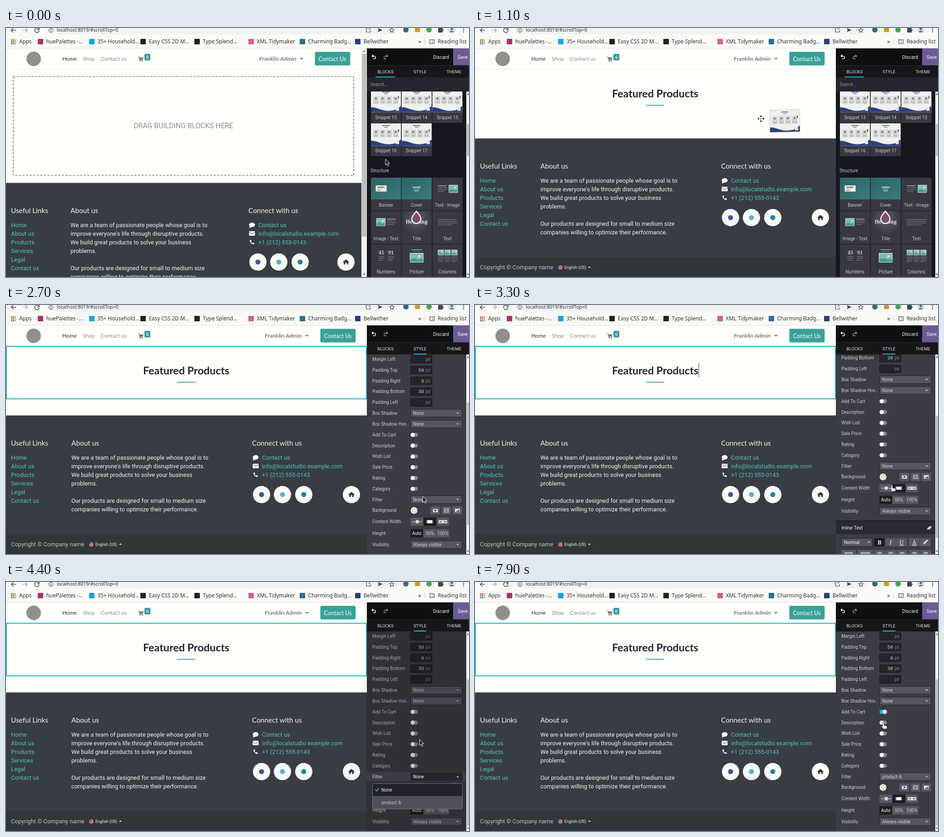
An HTML page that plays this animation: 1020 px wide and 549 px high, repeating every 8 s.

```html
<!DOCTYPE html>
<html lang="en">
<head>
<meta charset="utf-8">
<title>Website builder</title>
<style>
html, body { margin: 0; width: 100%; height: 100%; overflow: hidden; background: #fffffc; }
svg { display: block; }
text { white-space: pre; }
.r { font-family: Roboto, sans-serif; }
.l { font-family: Lato, sans-serif; }
.n { font-family: "Noto Sans", sans-serif; }
.s { font-family: "Noto Serif", serif; font-weight: 700; }
.m { font-family: "Liberation Mono", monospace; }
.b { font-weight: 700; }
</style>
</head>
<body>
<svg id="stage" width="1020" height="549" viewBox="0 0 1020 549"></svg>
<script>
const LOOP = 8000, STEP = 100;
const TEAL = '#3aa198', CYAN = '#16b8bd', LINK = '#4fc7ba', DARK = '#212529';

const R = (x, y, w, h, fill, more = '') => `<rect x="${x}" y="${y}" width="${w}" height="${h}" fill="${fill}" ${more}/>`;
const C = (x, y, r, fill, more = '') => `<circle cx="${x}" cy="${y}" r="${r}" fill="${fill}" ${more}/>`;
const P = (d, fill, more = '') => `<path d="${d}" fill="${fill}" ${more}/>`;
const L = (d, color, w = 1.5) => P(d, 'none', `stroke="${color}" stroke-width="${w}"`);
const T = (x, y, s, size, fill, font = 'r', more = '') =>
  `<text x="${x}" y="${y}" font-size="${size}" fill="${fill}" class="${font}" ${more}>${s}</text>`;
const G = (x, y, body, more = '') => `<g transform="translate(${x} ${y}) ${more}">${body}</g>`;
const MID = 'text-anchor="middle"', END = 'text-anchor="end"';
const down = (x, y, c, w = 4) => P(`M${x - w} ${y - w / 2}h${2 * w}l${-w} ${w}z`, c);
const up = (x, y, c, w = 4) => P(`M${x - w} ${y + w / 2}h${2 * w}l${-w} ${-w}z`, c);
const scrollbar = (x, w, top, thumbY, thumbH) => R(x, top, w, 549 - top, '#f1f1ee') +
  R(x + 1, thumbY, w - 2, thumbH, '#bfbfbd') + up(x + w / 2, top + 6, '#555', 3) + down(x + w / 2, 543, '#555', 3);

function browser() {
  const ink = '#45484b';
  const marks = [
    [70, 'huePalettes -…', '#a8326e'], [183, '35+ Household…', '#18a5e0'], [296, 'Easy CSS 2D M…', '#222'],
    [415, 'Type Splend…', '#222'], [534, 'XML Tidymaker', '#d9608a'], [647, 'Charming Badg…', '#2f6f93'],
    [769, 'Bellwither', '#27407f']];
  let s = R(0, 0, 1020, 45, '#fafaf7') + R(88, -20, 776, 34, '#f1f3f2', 'rx="14"') + R(0, 44, 1020, 1, '#dcdcda');
  s += L('M22 5H12M16.500 0L11.500 5L16.500 10', ink) + L('M37 5H47M42.500 0L47.500 5L42.500 10', '#a9acae');
  s += L('M72 2A5 5 0 1 0 73 6M73 0V4H68.500', ink) + C(99, 5, 4.800, 'none', `stroke="${ink}"`) + L('M99 4V8M99 1.500V3', ink);
  s += T(112, 8, 'localhost:8019/#scrollTop=0', 10.300, '#2b2d30', 'n');
  s += L('M798 0H794V9H803V5M799 4L803 0', ink, 1.200) + P('M819 0L830 4.500L819 9L821 4.500z', ink);
  s += L('M850 -1L851.700 3L855 3.300L852.500 6L853.200 9.500L850 7.800L846.800 9.500L847.500 6L845 3.300L848.300 3z', ink, 1.200);
  s += C(881, 4, 6, '#376b78') + R(901, -1, 11, 10, '#d39a2b') + C(932, 4, 6, '#43a657');
  s += P('M952 0h3a2 2 0 0 1 4 0h3v3a2 2 0 0 1 0 4v3h-10z', ink) + C(982, 4, 8, '#d5dbe2') + C(982, 2, 2.500, '#56657a') + P('M977 9q5-6 10 0z', '#56657a');
  for (const y of [0, 4, 8]) s += C(1008, y + .5, 1.300, ink);
  const dots = ['#e34a3f', '#e34a3f', '#e5a52c', '#3aa757', '#4285d0', '#e5a52c', '#3aa757', '#4285d0', '#e5a52c'];
  dots.forEach((c, i) => s += R(11 + i % 3 * 4, 25 + (i / 3 | 0) * 4, 3, 3, c));
  s += T(29, 34, 'Apps', 11.700, '#303236', 'n');
  for (const [x, name, c] of marks) s += R(x, 24, 12, 12, c, 'rx="1"') + T(x + 18.500, 34, name, 11.700, '#303236', 'n');
  s += T(908, 34, '»', 13, '#303236', 'n') + R(922, 23, 1, 14, '#cfd1d1');
  s += R(933.500, 25.500, 10, 9, 'none', `stroke="${ink}"`) + L('M935 28H936.500M935 32H936.500M938 28H942M938 32H942', ink, 1.200);
  return s + T(951, 34, 'Reading list', 11.700, '#303236', 'n');
}

function header(dx, width) {
  let s = R(0, 90, width, 2, '#f0f0ee') + C(61, 68, 16, '#8f8f8d');
  s += T(124, 72, 'Home', 12.100, '#2b2d30', 'l') + T(169, 72, 'Shop', 12.100, '#85878a', 'l') + T(209, 72, 'Contact us', 12.100, '#85878a', 'l');
  s += P('M291 63h2.500l.7 2h8.800l-1.500 5h-6l.3 1h6v1.300h-7.300l-2-8h-1.500z', '#77797c') + C(295.500, 73, 1.200, '#77797c') + C(300.500, 73, 1.200, '#77797c');
  s += R(305, 57, 13, 14.500, '#35979c', 'rx="3"') + T(311.500, 67.500, '0', 9, '#fff', 'l b', MID);
  s += T(558 + dx, 72, 'Franklin Admin', 12.200, '#74777a', 'l b') + down(651 + dx, 68, '#74777a');
  s += R(680.500 + dx, 52.500, 77.800, 30, TEAL, 'rx="3"') + T(719 + dx, 72.500, 'Contact Us', 12.500, '#fff', 'l', MID);
  return s;
}

function footer(top, width, x2, x3, socials) {
  const lines = (x, list, c) => list.map((s, i) => T(x, 97 + 19 * i, s, 12.900, c)).join('');
  let s = R(0, -.5, width, 400, '#383d43') + R(0, 261, width, 60, '#31363b');
  [[11, 'Useful Links'], [x2, 'About us'], [x3, 'Connect with us']].forEach(([x, h]) => s += T(x, 66, h, 15.400, '#f2f2f0', 'l'));
  s += lines(11, ['Home', 'About us', 'Products', 'Services', 'Legal', 'Contact us'], LINK);
  s += lines(x2, ['We are a team of passionate people whose goal is to', "improve everyone's life through disruptive products.",
    'We build great products to solve your business', 'problems.', '',
    'Our products are designed for small to medium size', 'companies willing to optimize their performance.'], '#f5f5f3');
  s += lines(x3 + 22, ['Contact us', 'info@localstudio.example.com', '+1 (212) 555-0143'], LINK);
  s += `<ellipse cx="${x3 + 8}" cy="92" rx="6.500" ry="5" fill="#fff"/>` + P(`M${x3 + 3} 94l-1 5l5-2z`, '#fff');
  s += R(x3 + 1.500, 106, 13, 10, '#fff', 'rx="1"') + L(`M${x3 + 2} 108l6 4.500l6-4.500`, '#383d43', 1);
  s += P('M0 1l2.500-1l1.500 3l-1.500 1.500q1 2 3 3l1.500-1.500l3 1.500l-1 2.500q-8-.5-9-9z', '#fff', `transform="translate(${x3 + 3} 125)"`);
  ['#36599b', '#4fb3e0', '#1583b5'].forEach((c, i) => s += C(socials[i], 174, 19, '#fbfbf8') + C(socials[i], 174, 5.500, c));
  const h = socials[3];
  s += C(h, 174, 19, '#fbfbf8') + P(`M${h - 7} 174l7-6l7 6l-1 1l-1-.8v5h-3.500v-4h-3v4h-3.500v-5l-1 .8z`, '#33373b');
  s += T(11, 288, 'Copyright © Company name', 12.900, '#c1c3c4') + C(188, 284, 5, '#c8737e') + P('M188 284h-5a5 5 0 0 1 5-5z', '#5b6ea8');
  s += T(197, 287, 'English (US)', 8.800, '#f5f5f3') + up(252, 283, '#f5f5f3', 3);
  return G(0, top, s);
}

function page(t) {
  if (t < 1000) {
    return header(0, 783) + R(16, 107, 750, 218, 'none', 'stroke="#7d7e7c" stroke-width="1.700" stroke-dasharray="4.800 3.150"') +
      T(391, 221, 'DRAG BUILDING BLOCKS HERE', 15.800, '#8d8f90', 'r', MID) +
      footer(342, 783, 142, 534, [555, 601, 648, 749]) + scrollbar(783, 12, 45, 57, 403);
  }
  let s = header(12, 795) + T(397, 152.500, 'Featured Products', 23.300, DARK, 'l b', MID) + R(377, 169.500, 40, 1.800, '#35979c');
  s += footer(244, 795, 144, 542, [563, 609, 656, 761]);
  if (t >= 2000 && t < 4000 && !(t >= 2600 && t < 3000)) s += R(492.500, 128, 1, 31, DARK);
  if (t >= 2300) s += R(1, 91, 793, 116, 'none', `stroke="${CYAN}" stroke-width="2"`);
  return s;
}

// Thumbnail of a product section, 66 by 49
function thumb() {
  let s = R(0, 0, 66, 49, '#f0f0ee') + R(25, 4, 16, 1.800, '#51639b') + R(29, 8, 8, 1.200, '#51639b');
  for (let i = 0; i < 4; i++) {
    const x = 5 + i * 14.500;
    s += R(x, 14, 12, 17, '#d3d3d2') + R(x + 4, 17, 4, 4, '#777b85') + R(x + 2, 27, 8, 1, '#8a8fa5');
  }
  return s + R(60, 13, 1.800, 6, '#34477f') + P('M0 37C15 37 25 47 43 45S58 39 66 34V49H0z', '#c3c9dc') +
    P('M0 38.500C15 38.500 25 48 43 46S58 40 66 36V49H0z', '#2b3f7c') + R(55, 39, 7, 7, '#e4e6ee');
}
const pic = (x, y, w, h) => R(x, y, w, h, '#f2f2f0') + R(x + 1, y + 1, w - 2, h - 2, '#76bdc9') +
  C(x + w * .7, y + h * .35, h * .13, '#f5e58b') +
  P(`M${x + 1} ${y + h * .7}Q${x + w * .35} ${y + h * .4} ${x + w * .65} ${y + h * .75}Q${x + w * .8} ${y + h * .5} ${x + w - 1} ${y + h * .7}V${y + h - 1}H${x + 1}z`, '#4a9d7d');
const bars = (x, y, w, n, gap = 4, c = '#73737d') =>
  Array.from({ length: n }, (_, i) => R(x, y + i * gap, i == n - 1 ? w * .75 : w, 1.400, c)).join('');

const structure = [
  ['Banner', R(0, 0, 66, 48, 'url(#sea)') + R(10.500, 17, 24, 13.500, '#f0f0ee') + R(14, 20, 16, 2, '#555') + R(14, 24, 12, 1.200, '#999') + R(14, 27, 7, 1.500, TEAL)],
  ['Cover', R(0, 0, 66, 48, 'url(#sea)') + R(24, 20, 18, 1.800, '#dfe9e8') + R(26, 24, 14, 1.200, '#b4cfce') + R(28, 28, 10, 1.500, '#dfe9e8')],
  ['Text - Image', R(12, 17, 19, 1.600, '#a8a8ae') + bars(12, 21, 20, 3) + pic(36, 16, 20, 17)],
  ['Image - Text', pic(12, 16, 20, 17) + R(35, 17, 19, 1.600, '#a8a8ae') + bars(35, 21, 20, 3)],
  ['Title', R(0, 0, 66, 72, 'url(#glow)') + T(33, 27, 'Heading', 11.500, '#e8e8e8', 's', MID)],
  ['Text', bars(12, 18, 42, 4)],
  ['Numbers', T(23, 22, '45', 11, '#d8d8da', 's', MID) + T(44, 22, '91', 11, '#d8d8da', 's', MID) + bars(16, 26, 14, 3) + bars(37, 26, 14, 3)],
  ['Picture', R(21, 11, 24, 1.500, '#a8a8ae') + R(24, 15, 18, 1.200, '#73737d') + pic(18, 19, 30, 21)],
  ['Columns', [12, 27, 42].map(x => pic(x, 12, 13, 12) + bars(x, 27, 13, 4, 3.500)).join('')]];

const tile = (x, y, name, art) => G(x, y, R(0, 0, 66.500, 72.500, '#383841') + art + T(33, 64, name, 10, '#c9c9cc', 'r', MID));

function blocks() {
  let s = R(795, 140, 225, 409, '#17171f');
  for (let i = 0; i < 5; i++) s += tile(804 + i % 3 * 67.700, 136.500 + (i / 3 | 0) * 73.700, 'Snippet ' + (13 + i), thumb());
  s += T(803, 318, 'Structure', 10, '#c9c9cc');
  structure.forEach(([name, art], i) => s += tile(804 + i % 3 * 67.700, 330 + (i / 3 | 0) * 73.500, name, art));
  s += P('M904 404c4 6 10 10 10 17a10 10 0 0 1-20 0c0-7 6-11 10-17z', '#7c4d71', 'stroke="#f5f2f4" stroke-width="2.500"');
  s += R(795, 109, 225, 31, '#25252d') + T(803, 128, 'Search...', 10, '#9a9a9f', 'r', 'font-style="italic"');
  return s + scrollbar(1014, 8, 140, 212, 70);
}

const select = (y, value, open) => R(891.500, y - 8.500, 113, 17, open ? '#26262d' : '#565660', 'stroke="#22222a" rx="1"') +
  T(897, y + 3.500, value, 10, open ? '#fff' : '#d4d4d8') + (open ? up : down)(995, y, '#c9c9cc', 3);
const number = (y, v) => R(891.500, y - 8.500, 47, 17, '#24242b', 'stroke="#141419" rx="1"') +
  T(921, y + 3.500, v, 10.500, '#d4d4d8', 'm', END) + T(924.500, y + 3.500, 'px', 10, '#808087');
const toggle = (y, on) => R(891, y - 4.500, 16.500, 9, on ? CYAN : '#85858c', 'rx="4.500"') + C(on ? 903 : 896, y, 4.600, '#f8f8f8');
const button = (x, y, w, on) => R(x, y - 9, w - 1, 18, on ? '#1b1b21' : '#595963', 'rx="1"');

function background(y) {
  let s = C(899, y, 7.500, '#f7f7f5');
  for (const [x, dy] of [[-5, -2], [-1, -6], [-1, 2], [3, -2]]) s += R(899 + x, y + dy, 4, 4, '#d0d0ce');
  for (const x of [935, 960, 984]) s += button(x, y, 22);
  s += R(940.500, y - 3.500, 11, 7.500, '#ddd', 'rx="1"') + C(946, y, 2.300, '#595963');
  s += R(965.500, y - 4, 10, 8, 'none', 'stroke="#ddd"') + L(`M968 ${y - 4}v8M973 ${y - 4}v8M968 ${y}h5`, '#ddd', 1);
  return s + R(989, y - 4, 11, 8, '#ddd') + P(`M990 ${y + 3}l9-5v5z`, '#595963');
}
function widths(y) {
  let s = button(891, y, 29) + button(920, y, 29, 1) + button(949, y, 28);
  s += R(902.500, y - 3.500, 7, 7, '#ddd') + L(`M896 ${y}h5M911 ${y}h5`, '#ddd') + R(928, y - 3.500, 11, 7, '#fff') + L(`M926.500 ${y - 4}v8M940.500 ${y - 4}v8`, '#aaa', 1);
  return s + R(953, y - 3.500, 19, 7, '#ddd') + L(`M955 ${y}h5M965 ${y}h5`, '#444');
}
const heights = y => ['Auto', '50%', '100%'].map((s, i) => button(891 + 28.700 * i, y, 28.700, i == 0) +
  T(905 + 28.700 * i, y + 3.500, s, 10, i ? '#c9c9cc' : '#fff', 'r', MID)).join('');

const menuOpen = t => t >= 4300 && t < 6600;
// label, control, extra offset below the even row pitch
function rows(t) {
  const flags = ['Add To Cart', 'Description', 'Wish List', 'Sale Price', 'Rating', 'Category'];
  const pads = [['Margin Left', ''], ['Padding Top', 50], ['Padding Right', 0], ['Padding Bottom', 30], ['Padding Left', '']];
  return [
    ...pads.map(([name, v]) => [name, y => number(y, v)]),
    ['Box Shadow', y => select(y, 'None')], ['Box Shadow Hov…', y => select(y, 'None')],
    ...flags.map((name, i) => [name, y => toggle(y, i == 0 && t >= 7200)]),
    ['Filter', y => select(y, t >= 6600 ? 'product A' : 'None', menuOpen(t))],
    ['Background', background], ['Content Width', widths, 1], ['Height', heights, 3], ['Visibility', y => select(y, 'Always visible'), 4]];
}
const row = ([name, draw, extra = 0], i) => {
  const y = 119.500 + 23.820 * i + extra;
  return T(807, y + 3.500, name, 10, '#cfcfd3') + draw(y);
};

function inlineText() {
  let s = R(795, 549, 219, 2, '#1b1b21') + R(795, 551, 219, 28, '#2a2a32') + T(807, 569, 'Inline Text', 10.500, '#f0f0f2');
  s += P('M995 569l5-7h7l-5 7z', '#c9c9cc') + R(807.500, 588.500, 68, 18, '#565660', 'stroke="#22222a"') + T(813, 601, 'Normal', 10.500, '#f0f0f2') + down(868, 597, '#ccc', 3);
  ['B', 'I', 'U', 'A', ''].forEach((c, i) => {
    const x = (i < 3 ? 879 : 882) + 24.500 * i;
    const style = i == 0 ? 'font-weight="700"' : i == 1 ? 'font-style="italic"' : 'text-decoration="underline"';
    s += button(x, 597, 24.500, i == 0) + (c ? `<text x="${x + 12}" y="602" font-size="13" fill="#eee" font-family="Noto Serif, serif" text-anchor="middle" ${style}>${c}</text>`
      : P(`M${x + 7} 602l2-5l7-6l2 2l-6 7z`, '#ddd'));
  });
  for (const [x, w] of [[807, 32], [842, 35], [879, 24], [904, 24], [929, 24], [956, 24], [981, 24]]) {
    s += R(x, 614, w, 18, '#595963') + R(x + 7, 619, w - 14, 1.500, '#ddd') + R(x + 7, 622, w - 14, 1.500, '#ddd');
  }
  return s;
}

function menu(t) {
  const onNone = t >= 6100 && t < 6500, lit = '#454550', dim = '#22222a';
  return P('M981 445l6-5l6 5z', '#454550') + R(807.500, 444.500, 198, 56, dim, 'stroke="#77777f" rx="1"') +
    R(808, 445, 197, 27.500, onNone ? lit : dim) + R(808, 473, 197, 27, onNone ? dim : '#50505a') + R(808, 472, 197, 1, '#5b5b64') +
    L('M813.500 458l3 3l5-6', CYAN, 2) + T(827, 462, 'None', 10, '#f5f5f5') + T(827, 489.500, 'product A', 10, '#c9c9cc');
}

function options(t) {
  const early = t < 4000, list = rows(t);
  const scroll = early ? Math.round(74 * Math.min(1, Math.max(0, (t - 2900) / 400))) : 0;
  let s = R(795, 109, 225, 440, '#3c3c45') + G(0, -scroll, list.map(row).join('') + (early ? inlineText() : ''));
  if (menuOpen(t)) s += R(795, 109, 219, 440, '#000', 'opacity=".2"') + R(795, 419, 219, 20, '#3c3c45') + row(list[13], 13) + menu(t);
  return s + scrollbar(1014, 8, 109, 215 + 29 * scroll / 74, early ? 270 : 322);
}

function panel(t) {
  const styling = t >= 2300;
  let s = (styling ? options(t) : blocks()) + R(795, 45, 225, 37, '#0f0f12') + R(795, 82, 225, 27, '#17171a') + R(795, 82, 225, 1, '#2b2b2f');
  s += L('M807 62h4a3 3 0 1 1-2 5', '#f2f2f2', 1.600) + P('M805 62l4-4v7z', '#f2f2f2');
  s += L('M840 62h-4a3 3 0 1 0 2 5', '#8d8d90', 1.600) + P('M842 62l-4-4v7z', '#8d8d90');
  s += T(941, 67.500, 'Discard', 10.400, '#f2f2f2') + R(985, 45, 35, 37, '#6c5b95') + T(995, 67.500, 'Save', 10.400, '#fff');
  [['BLOCKS', 836], ['STYLE', 912], ['THEME', 987]].forEach(([name, x]) => s += T(x, 99.500, name, 9.800, '#dedee0', 'r', MID));
  return s + (styling ? R(898, 107, 28, 2, CYAN) : R(814, 107, 43, 2, CYAN));
}

const pointers = {
  arrow: P('M0 0v13l3-2.800l2.200 5l2.200-1l-2.200-4.700h4z', '#1a1a1c', 'stroke="#f5f5f5"'),
  hand: P('M0 1q1.500-2 3 0v5l6 1.500q1.500.5 1 2.500l-1 4h-7l-4.500-5.500q0-2 2.500-.5z', '#fff', 'stroke="#1a1a1c" stroke-width=".8"'),
  beam: L('M-2.500-6q2.500 0 2.500 1.500q0-1.500 2.500-1.500M0-4.500V4.500M-2.500 6q2.500 0 2.500-1.500q0 1.500 2.500 1.500', '#222', 1.200),
  move: P('M0-8l4 4l4 4l-4 4l-4 4l-4-4l-4-4l4-4z', '#fff') + C(0, 0, 1.500, '#222') +
    [0, 90, 180, 270].map(a => P('M0-7.500l3 3.500h-6z', '#222', `transform="rotate(${a})"`)).join('')
};
// time, x, y, pointer
const path = [
  [0, 836, 289, 'arrow'], [500, 838, 245, 'hand'], [900, 850, 236, 'move'], [1100, 630, 200, 'move'], [1400, 600, 190, 'arrow'],
  [1900, 542, 133, 'beam'], [2300, 542, 133, 'arrow'], [2700, 918, 422, 'arrow'], [2800, 916, 407, 'hand'], [3300, 917, 397, 'hand'],
  [3700, 917, 397, 'arrow'], [3900, 112, 150, 'arrow'], [4200, 950, 429, 'arrow'], [4400, 911, 347, 'arrow'], [4500, 911, 347, 'arrow'],
  [4800, 920, 300, 'arrow'], [5100, 905, 370, 'arrow'], [5400, 890, 446, 'arrow'], [5700, 899, 454, 'hand'], [6400, 899, 454, 'hand'],
  [6500, 899, 482, 'hand'], [6600, 898, 436, 'arrow'], [6700, 898, 436, 'arrow'], [6800, 901, 336, 'arrow'], [6900, 901, 336, 'arrow'],
  [7000, 900, 320, 'arrow'], [7200, 897, 284, 'hand'], [7400, 896, 326, 'arrow'], [7500, 896, 326, 'arrow'], [7700, 896, 312, 'arrow'],
  [7800, 896, 312, 'arrow'], [7900, 898, 310, 'hand'], [8000, 898, 310, 'hand']];

function pointer(t) {
  const i = path.findIndex(k => k[0] > t), [t0, x0, y0, kind] = path[i - 1], [t1, x1, y1] = path[i];
  const k = (t - t0) / (t1 - t0), x = x0 + (x1 - x0) * k, y = y0 + (y1 - y0) * k;
  const ghost = t >= 1000 && t < 1300
    ? G(x + 19, y - 19, thumb() + R(0, 0, 66, 49, 'none', 'stroke="#aaa" stroke-width=".6"'), 'rotate(-1.200)') : '';
  return ghost + G(x, y, pointers[kind]);
}

const defs = `<defs><linearGradient id="sea" x2="1" y2="1"><stop stop-color="#2b6468"/><stop offset="1" stop-color="#3a7b78"/></linearGradient>
<radialGradient id="glow" cy=".25"><stop stop-color="#606067"/><stop offset="1" stop-color="#383841"/></radialGradient></defs>`;
const stage = document.getElementById('stage');
const start = performance.now();
let last = -1;

function draw() {
  const t = Math.floor((performance.now() - start) % LOOP / STEP) * STEP;
  if (t !== last) {
    last = t;
    stage.innerHTML = defs + R(0, 0, 1020, 549, '#fffffc') + page(t) + panel(t) + browser() + pointer(t);
  }
  requestAnimationFrame(draw);
}
draw();
</script>
</body>
</html>
```
